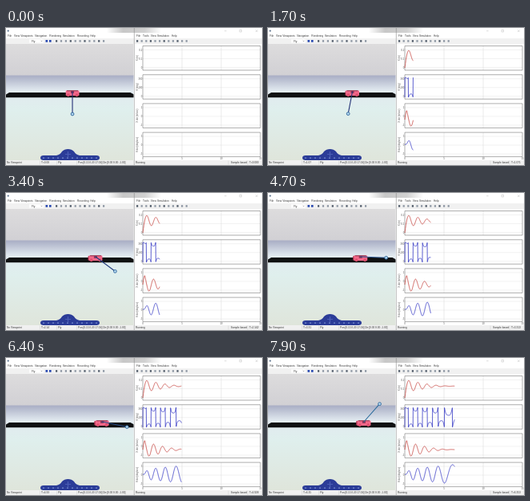
Recreate the animation shown at these times as an HTML page. Size 320 px wide and 172 px high, loop 8000 ms.

```html
<!DOCTYPE html>
<html lang="en">
<head>
<meta charset="utf-8">
<title>Cart and pendulum simulation</title>
<style>
  html, body { margin: 0; width: 100%; height: 100%; overflow: hidden; background: #fff; }
  svg { display: block; width: 100%; height: 100%; }
  text { font-family: "Liberation Sans", Arial, sans-serif; font-size: 3.2px; fill: #333; }
  .axis text { font-size: 2.9px; fill: #555; }
  .trace { fill: none; stroke-width: .8; stroke-linejoin: round; }
</style>
</head>
<body>
<svg viewBox="0 0 320 172" preserveAspectRatio="none">
  <defs>
    <linearGradient id="sky" x2="0" y2="1">
      <stop offset="0" stop-color="#dddcdd"/><stop offset="1" stop-color="#d1d0d4"/>
    </linearGradient>
    <linearGradient id="ground" x2="0" y2="1">
      <stop offset="0" stop-color="#a8adc4"/><stop offset=".18" stop-color="#e2eaf0"/>
      <stop offset=".4" stop-color="#dfefed"/><stop offset="1" stop-color="#dfe5db"/>
    </linearGradient>
    <linearGradient id="shade">
      <stop offset="0" stop-color="#999" stop-opacity="0"/><stop offset=".3" stop-color="#999" stop-opacity=".55"/>
      <stop offset=".7" stop-color="#999" stop-opacity=".45"/><stop offset="1" stop-color="#999" stop-opacity="0"/>
    </linearGradient>
    <clipPath id="view"><rect y="20" width="159.5" height="146"/></clipPath>
  </defs>
  <rect width="320" height="172" fill="#fff"/>
  <rect x="126" width="68" height="6" fill="url(#shade)"/>
  <g id="chrome"></g>
  <g clip-path="url(#view)">
    <rect y="20" width="160" height="40" fill="url(#sky)"/>
    <rect y="59.5" width="160" height="107" fill="url(#ground)"/>
    <path d="M4 81H155.5L160 83.5V87.3H0V83.5Z" fill="#101112"/>
    <path id="side" fill="#b83a58"/>
    <g id="cart">
      <rect x="-8.3" y="78.5" width="16.8" height="6.4" rx="1" fill="#f2688a"/>
      <rect x="-7" y="78.3" width="14" height="1" fill="#8d2d45"/>
      <rect x="-2" y="79" width="4" height="2.8" fill="#8b3458"/>
      <circle cx="-5.2" cy="84.2" r="1.9" fill="#e0506f"/>
      <circle cx="5.4" cy="84.2" r="1.9" fill="#e0506f"/>
    </g>
    <path id="rod" fill="none" stroke-width="1.1" stroke-linecap="round"/>
    <circle id="bob" r="1.9" fill="#b4d9f0" stroke="#2b6299" stroke-width=".9"/>
    <g id="panel">
      <path d="M43 163Q43 160 47 160H63Q68 159 70 155Q73 152 77.5 152Q82 152 85 155Q87 159 92 160H113Q117 160 117 163Q117 166 113 166H47Q43 166 43 163Z" fill="#2b3c98"/>
      <path d="M77.5 155v7M74 158.5h7" stroke="#4a5db4" stroke-width="1.2"/>
    </g>
  </g>
  <g id="plots"></g>
  <text id="clockLeft" x="44" y="170.4"></text>
  <text id="clockRight" x="304" y="170.4"></text>
</svg>
<script>
const $ = id => document.getElementById(id);
const { PI, sin, cos, exp, min, max } = Math;

function add(parent, tag, attrs, label) {
  const node = document.createElementNS('http://www.w3.org/2000/svg', tag);
  for (const key in attrs) node.setAttribute(key, attrs[key]);
  if (label) node.textContent = label;
  parent.appendChild(node);
  return node;
}
const line = (parent, d, stroke, width = .5) =>
  add(parent, 'path', { d, stroke, 'stroke-width': width, fill: 'none' });

// Window frames, menus, toolbars and status bars
const chrome = $('chrome');
const write = (x, y, label) => add(chrome, 'text', { x, y }, label);
const box = (x, y, width, height, fill) => add(chrome, 'rect', { x, y, width, height, fill });

function windowFrame(left, right, menus) {
  box(left, 13, right - left, 7, '#f1f1f1');
  box(left, 166, right - left, 6, '#f0f0f0');
  let x = left + 2;
  for (const label of menus.split(' ')) {
    write(x, 11.4, label);
    x += label.length * 1.67 + 1.4;
  }
}
function icons(from, to, step) {
  for (let x = from, i = 0; x <= to; x += step, i++)
    box(x, 15.2, 2.2, 2.4, i % 3 ? '#8a94a1' : '#4d5866');
}
windowFrame(0, 160, 'File View Viewpoints Navigation Rendering Simulation Recording Help');
windowFrame(161, 320, 'File Tools View Simulation Help');
add(chrome, 'circle', { cx: 2.7, cy: 3.6, r: 1.1, fill: '#59718c' });
line(chrome, 'M273 3.7h2.6M292 2.4h2.5v2.5h-2.5zM312 2.4l2.6 2.6m0-2.6l-2.6 2.6', '#aaa', .4);

box(29, 14.3, 18, 4.2, '#fff');
write(32, 17.5, 'Fly');
line(chrome, 'M43.5 15.8l1 1 1-1', '#555');
line(chrome, 'M49.5 16.4h2.6M54 16.4h2.6', '#2949b0', 2.6);
icons(62, 122, 5.9);
icons(163, 226, 5.6);

write(1, 170.4, 'No Viewpoint');
write(65, 170.4, 'Fly');
write(90, 170.4, 'Pos:[0.15 0.20 17.04] Dir:[0.00 0.00 -1.00]');
write(162, 170.4, 'Running');
write(281, 170.4, 'Sample based');
line(chrome, 'M42.5 166.5v5M63.5 166.5v5M88.5 166.5v5M278 166.5v5M302 166.5v5', '#cfcfcf');
line(chrome, 'M160.3 0V172', '#888', .6);

for (let i = 0; i < 12; i++)
  add($('panel'), 'circle', { cx: 47 + i * 6, cy: 163.2, r: .9, fill: '#6f86cc' });

// Signals over simulated seconds s; plotted ones return a height on the stage
const simulated = t => .63 * t + .32 * max(0, t - 3.6);
const onset = s => 1 - exp(-((s / .45) ** 2));

// Half swings completed; the rhythm slows as the swings widen
function halfSwings(s) {
  const u = s - .46;
  return 1.793 * u - .0655 * u * u + .011 * u * (u - 1.7) * (5.61 - u);
}
// Degrees from hanging; wide swings linger at their ends
const angle = s =>
  onset(s) * (62 + 2.6 * s * s) * sin(PI / 2 * sin(PI * halfSwings(s)));

const position = s =>
  35.3 + (6.5 * exp(-((s / 3) ** 2)) + 9 * exp(-s / .2)) * cos(PI * (s + .06) / .58);
const speed = s =>
  115 + .24 * min(1, 4 * s) * (position(s + .01) - position(s - .01)) / .02;
const wrappedAngle = s => 87 - 25 * ((angle(s) + 360) % 360) / 360;
const spin = s => 146 - onset(s) * (6 + s) * cos(PI * halfSwings(s));

const LEFT = 171, RIGHT = 318, PER_SECOND = 9.8, HEIGHT = 30.5;
const RED = '#c5413b', BLUE = '#3438c4';
const plots = [
  { label: 'X (m)', ticks: ['0.2', '0.1', '0'], color: RED, at: position },
  { label: 'θ (deg)', ticks: ['360', '180', '0'], color: BLUE, at: wrappedAngle },
  { label: 'X dot (m/sec)', ticks: ['1', '0', '-1'], color: RED, at: speed },
  { label: 'θ dot (deg/sec)', ticks: ['5', '0', '-5'], color: BLUE, at: spin }
];
plots.forEach((plot, row) => {
  const group = add($('plots'), 'g', { class: 'axis' });
  const top = 22.5 + 36.2 * row;
  plot.ticks.forEach((label, i) => {
    const y = top + 5 + i * 11;
    line(group, `M${LEFT} ${y}H${RIGHT}`, '#dedede', .4);
    add(group, 'text', { x: 170.4, y: y + 1, 'text-anchor': 'end' }, label);
  });
  line(group, `M220 ${top}v${HEIGHT}M269 ${top}v${HEIGHT}`, '#d5d5d5');
  line(group, `M${LEFT} ${top}H${RIGHT}v${HEIGHT}H${LEFT}Z`, '#777', .6);
  add(group, 'text', {
    transform: `translate(165.3 ${top + HEIGHT / 2}) rotate(-90)`, 'text-anchor': 'middle'
  }, plot.label);
  plot.path = add(group, 'path', { class: 'trace', stroke: plot.color });
});
const scale = add($('plots'), 'g', { class: 'axis' });
for (let s = 0; s <= 15; s += 5)
  add(scale, 'text', { x: LEFT + s * PER_SECOND, y: 164.9, 'text-anchor': 'middle' }, String(s));

function trace(at, end) {
  const point = s => `${(LEFT + s * PER_SECOND).toFixed(2)} ${at(s).toFixed(2)}`;
  let d = 'M' + point(0);
  for (let s = .02; s < end; s += .02) d += 'L' + point(s);
  return d + 'L' + point(end);
}

function draw(t) {
  const s = simulated(t);
  for (const plot of plots) plot.path.setAttribute('d', trace(plot.at, s));

  const cart = 83 + (50 - position(s)) * 2.5;
  const face = cart - 7.8, back = face - (cart - 80) * .05;
  $('cart').setAttribute('transform', `translate(${cart} 0)`);
  $('side').setAttribute('d', `M${face} 78.6L${back} 79.5V84L${face} 85Z`);

  const theta = angle(s) * PI / 180;
  const length = 28 + 4 * sin(theta) ** 2;
  const x = cart + length * sin(theta), y = 80 + length * cos(theta);
  const light = (1 - cos(theta)) / 2;
  $('rod').setAttribute('d', `M${cart} 80L${x} ${y}`);
  $('rod').setAttribute('stroke', `rgb(${35 + 10 * light},${48 + 70 * light},${118 + 45 * light})`);
  $('bob').setAttribute('cx', x);
  $('bob').setAttribute('cy', y);

  $('clockLeft').textContent = 'T=' + s.toFixed(2);
  $('clockRight').textContent = 'T=' + s.toFixed(3);
}

const LOOP = 8000, STEP = 100;
const start = performance.now();
function tick() {
  const elapsed = (performance.now() - start) % LOOP;
  draw(Math.floor(elapsed / STEP) * STEP / 1000);
  requestAnimationFrame(tick);
}
tick();
</script>
</body>
</html>
```
